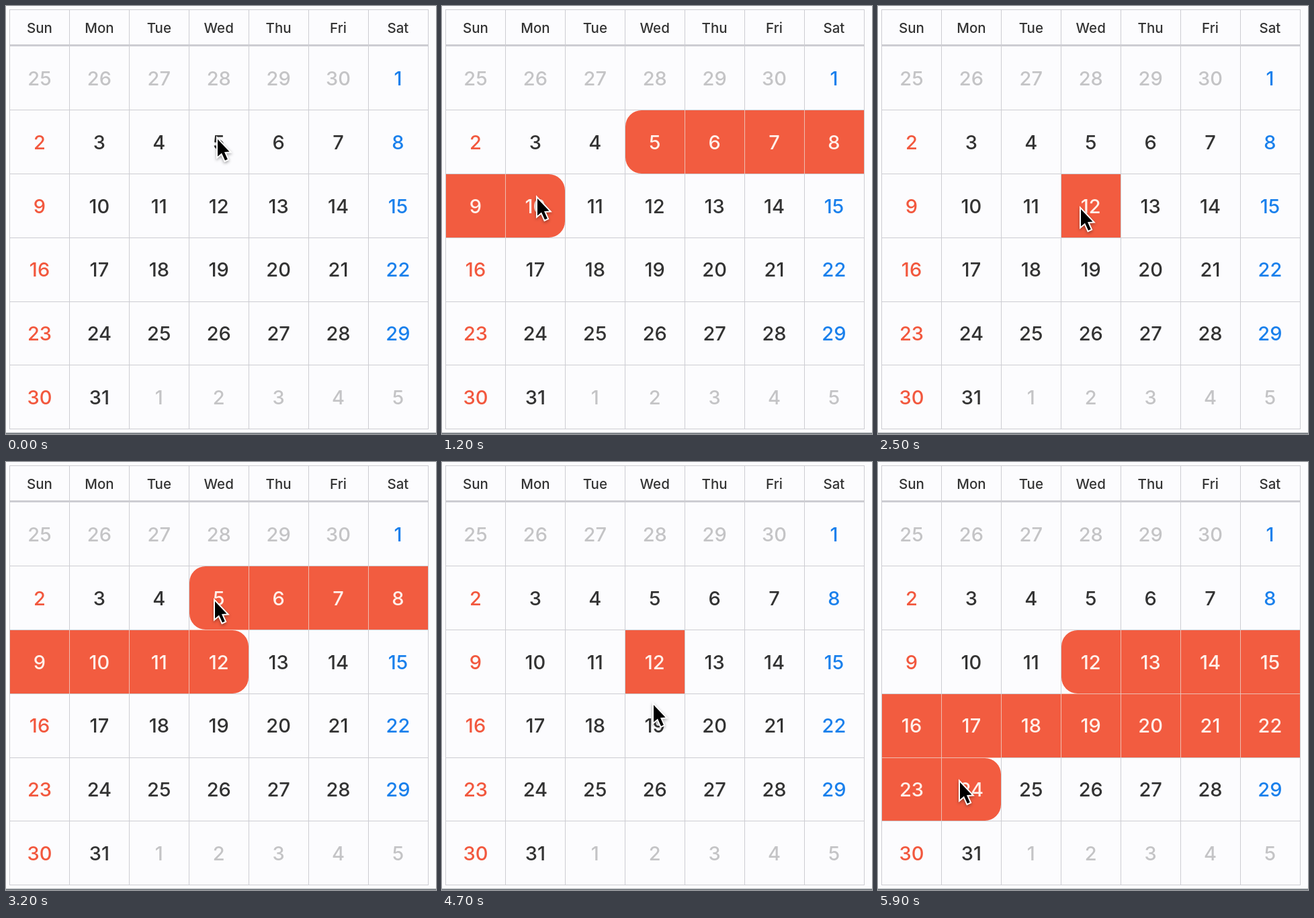
Recreate the animation shown at these times as an HTML page with a canvas. Size 640x636 px, loop 6 s.

```html
<!DOCTYPE html>
<html lang="en">
<head>
<meta charset="utf-8">
<title>Calendar range selection</title>
<style>
  html, body { margin: 0; width: 100%; height: 100%; overflow: hidden; background: #fcfcfe; }
  canvas { display: block; }
</style>
</head>
<body>
<canvas id="stage" width="640" height="636"></canvas>
<script>
const ctx = document.getElementById('stage').getContext('2d');
const LOOP = 6000, STEP = 100, CLICK_PAUSE = 200;
const DAYS = ['Sun', 'Mon', 'Tue', 'Wed', 'Thu', 'Fri', 'Sat'];
const COLOR = {
  page: '#fcfcfe', line: '#cdcdd2', lineOnFill: '#efbdb0', footer: '#80858a',
  text: '#333333', muted: '#c4c4c6', sunday: '#f2583e', saturday: '#1a80ec',
  fill: '#f25c40', picked: '#fff0ea'
};

const EDGE = 5, CELL_W = 88.9, CELL_H = 94.83, RADIUS = 24;
const colX = col => Math.round(5.4 + col * CELL_W);
const rowY = row => Math.round(59.2 + row * CELL_H);
const centerX = col => 50 + col * CELL_W;

// The month starts on a Saturday.
const FIRST_COL = 6, LENGTH = 31, PREVIOUS = 30;

// Where the pointer rests; a stop without a click is only passed through.
const STOPS = [
  { arrive: 0, click: 400, x: 315, y: 198 },
  { arrive: 900, click: 1200, x: 142, y: 286 },
  { arrive: 1800, click: 2400, x: 302, y: 302 },
  { arrive: 2800, click: 3100, x: 311, y: 207 },
  { arrive: 3900, click: 4200, x: 312, y: 300 },
  { arrive: 4700, x: 315, y: 361 },
  { arrive: 5300, click: 5600, x: 122, y: 476 }
];
const ARROW = new Path2D('M0 0V25.5L6 20.5L11 31.5L14.8 29.8L10 19L17.5 18.5Z');

const ease = u => u * u * (3 - 2 * u);
const mix = (a, b, u) => a + (b - a) * u;

function pointerAt(t) {
  const index = STOPS.findLastIndex(stop => stop.arrive <= t);
  const from = STOPS[index], to = STOPS[index + 1];
  if (!to) return from;
  const leave = from.click === undefined ? from.arrive : from.click + CLICK_PAUSE;
  const u = ease(Math.max(0, (t - leave) / (to.arrive - leave)));
  return { x: mix(from.x, to.x, u), y: mix(from.y, to.y, u) };
}

function dayUnder({ x, y }) {
  const col = Math.floor((x - colX(0)) / CELL_W), row = Math.floor((y - rowY(0)) / CELL_H);
  return row * 7 + col - FIRST_COL + 1;
}

// Clicks alternate between starting a range and closing it.
function selectionAt(t) {
  const clicked = STOPS.filter(stop => stop.click <= t).map(dayUnder);
  if (!clicked.length) return null;
  const range = clicked.slice(clicked.length % 2 ? -1 : -2);
  return { from: Math.min(...range), to: Math.max(...range) };
}

function rect(color, x, y, w, h) {
  ctx.fillStyle = color;
  ctx.fillRect(x, y, w, h);
}

function label(text, x, baseline, size, color) {
  ctx.font = `500 ${size}px Inter, sans-serif`;
  ctx.fillStyle = color;
  ctx.fillText(text, x, baseline);
}

function dayColor(day, col, selected) {
  if (selected) return COLOR.picked;
  if (day < 1 || day > LENGTH) return COLOR.muted;
  return col === 0 ? COLOR.sunday : col === 6 ? COLOR.saturday : COLOR.text;
}

function dayNumber(day) {
  return day < 1 ? day + PREVIOUS : day > LENGTH ? day - LENGTH : day;
}

function drawGrid() {
  const size = colX(7) - EDGE + 1;
  for (let col = 0; col <= 7; col++) rect(COLOR.line, colX(col), EDGE, 1, size);
  for (let row = 1; row <= 6; row++) rect(COLOR.line, EDGE, rowY(row), size, 1);
  rect(COLOR.line, EDGE, EDGE, size, 1);
  rect(COLOR.line, EDGE, rowY(0) - 2, size, 3);
  rect(COLOR.footer, 0, 634, 640, 2);
}

function drawFill(day, col, row, { from, to }) {
  const x = colX(col), y = rowY(row);
  const w = colX(col + 1) - x, h = rowY(row + 1) - y;
  const left = day === from && from !== to ? RADIUS : 0;
  const right = day === to && from !== to ? RADIUS : 0;
  ctx.fillStyle = COLOR.fill;
  ctx.beginPath();
  ctx.roundRect(x + 1, y + 1, w - 1, h - 1, [left, right, right, left]);
  ctx.fill();
  if (day > from && col > 0) rect(COLOR.lineOnFill, x, y + 1, 1, h - 1);
  if (day - 7 >= from) rect(COLOR.lineOnFill, x + 1, y, w - 1, 1);
}

function drawPointer({ x, y }) {
  ctx.save();
  ctx.translate(x, y);
  ctx.lineWidth = 4;
  ctx.strokeStyle = '#fff';
  ctx.shadowColor = 'rgba(0, 0, 0, .35)';
  ctx.shadowBlur = 4;
  ctx.shadowOffsetY = 2;
  ctx.stroke(ARROW);
  ctx.shadowColor = 'transparent';
  ctx.fillStyle = '#000';
  ctx.fill(ARROW);
  ctx.restore();
}

function draw(t) {
  const range = selectionAt(t);
  rect(COLOR.page, 0, 0, 640, 636);
  drawGrid();
  ctx.textAlign = 'center';
  DAYS.forEach((name, col) => label(name, centerX(col), 39.7, 20.5, COLOR.text));
  for (let slot = 0; slot < 42; slot++) {
    const col = slot % 7, row = Math.floor(slot / 7), day = slot - FIRST_COL + 1;
    const selected = range && day >= range.from && day <= range.to;
    if (selected) drawFill(day, col, row, range);
    label(dayNumber(day), centerX(col), 118 + row * CELL_H, 29, dayColor(day, col, selected));
  }
  drawPointer(pointerAt(t));
}

function tick() {
  const t = performance.now() % LOOP;
  draw(Math.floor(t / STEP) * STEP);
  requestAnimationFrame(tick);
}
tick();
</script>
</body>
</html>
```
